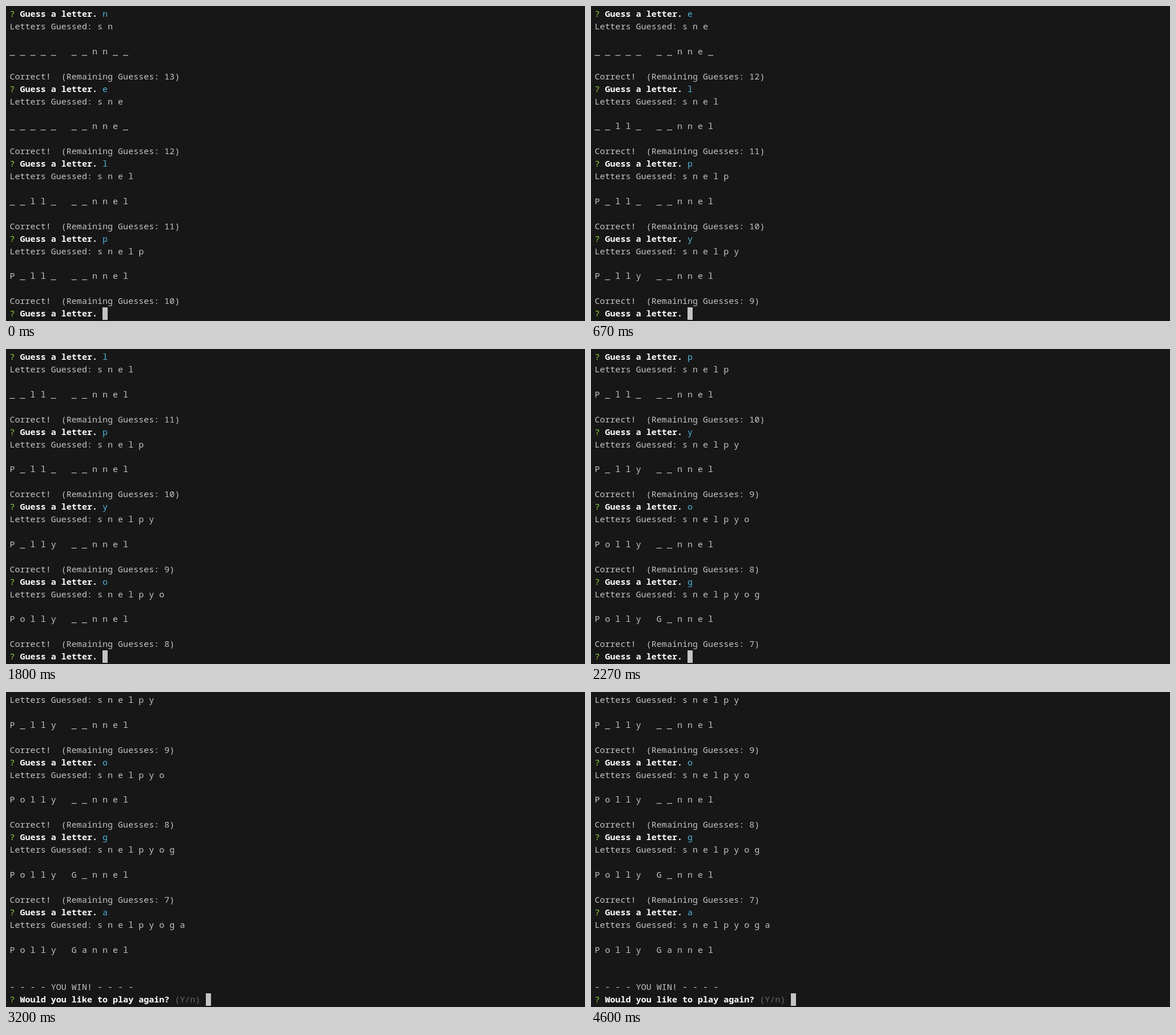
Animation of 1014 by 553 pixels, one loop 5.34 s. Source, as an HTML page:

```html
<!DOCTYPE html>
<html lang="en">
<head>
<meta charset="utf-8">
<title>Word guess</title>
<style>
  html, body { margin: 0; width: 100%; height: 100%; overflow: hidden; background: #171717; }
  pre {
    position: absolute; left: 6.5px; top: 3.1px; margin: 0;
    font: 15.05px/21.92px "Noto Sans Mono", monospace; color: #c4c4c4;
  }
  b { color: #fff; font-weight: 600; }
  .mark { color: #92d832; }
  .answer { color: #4fb4d8; }
  .hint { color: #6b6b6b; }
  .cursor { display: inline-block; background: #c4c4c4; }
</style>
</head>
<body>
<pre id="screen"></pre>
<script>
const LOOP = 5340, ROWS = 25, TRIES = 14;
const WORD = "Polly Gannel", GUESSES = "snelpyoga", FIRST = 5;
// Times at which each remaining letter is typed and entered
const KEYS = [
  { typed: 200, entered: 470 },
  { typed: 1070, entered: 1330 },
  { typed: 2000, entered: 2200 },
  { typed: 2870, entered: 3200 }
];

const screen = document.getElementById("screen");
const span = (cls, text) => `<span class="${cls}">${text}</span>`;
const ask = (question, rest) => `${span("mark", "?")} <b>${question}</b> ${rest}`;
const spaced = text => [...text].join(" ");
const cursor = span("cursor", " ");

function round(i) {
  const used = GUESSES.slice(0, i + 1);
  const shown = WORD.replace(/[a-z]/gi, c => used.includes(c.toLowerCase()) ? c : "_");
  const won = shown === WORD;
  return [
    ask("Guess a letter.", span("answer", GUESSES[i])),
    "Letters Guessed: " + spaced(used),
    "",
    spaced(shown),
    "",
    ...(won ? ["", "- - - - YOU WIN! - - - -"]
            : [`Correct!  (Remaining Guesses: ${TRIES - i})`])
  ];
}

function render(t) {
  const done = FIRST + KEYS.filter(k => t >= k.entered).length;
  const lines = [];
  for (let i = 1; i < done; i++) lines.push(...round(i));
  if (done === GUESSES.length) {
    lines.push(ask("Would you like to play again?", span("hint", "(Y/n)") + " " + cursor));
  } else {
    const typed = t >= KEYS[done - FIRST].typed ? GUESSES[done] : "";
    lines.push(ask("Guess a letter.", typed + cursor));
  }
  return lines.slice(-ROWS).join("\n");
}

const start = performance.now();
let last = "";
function frame() {
  const html = render((performance.now() - start) % LOOP);
  if (html !== last) screen.innerHTML = last = html;
  requestAnimationFrame(frame);
}
frame();
</script>
</body>
</html>
```
